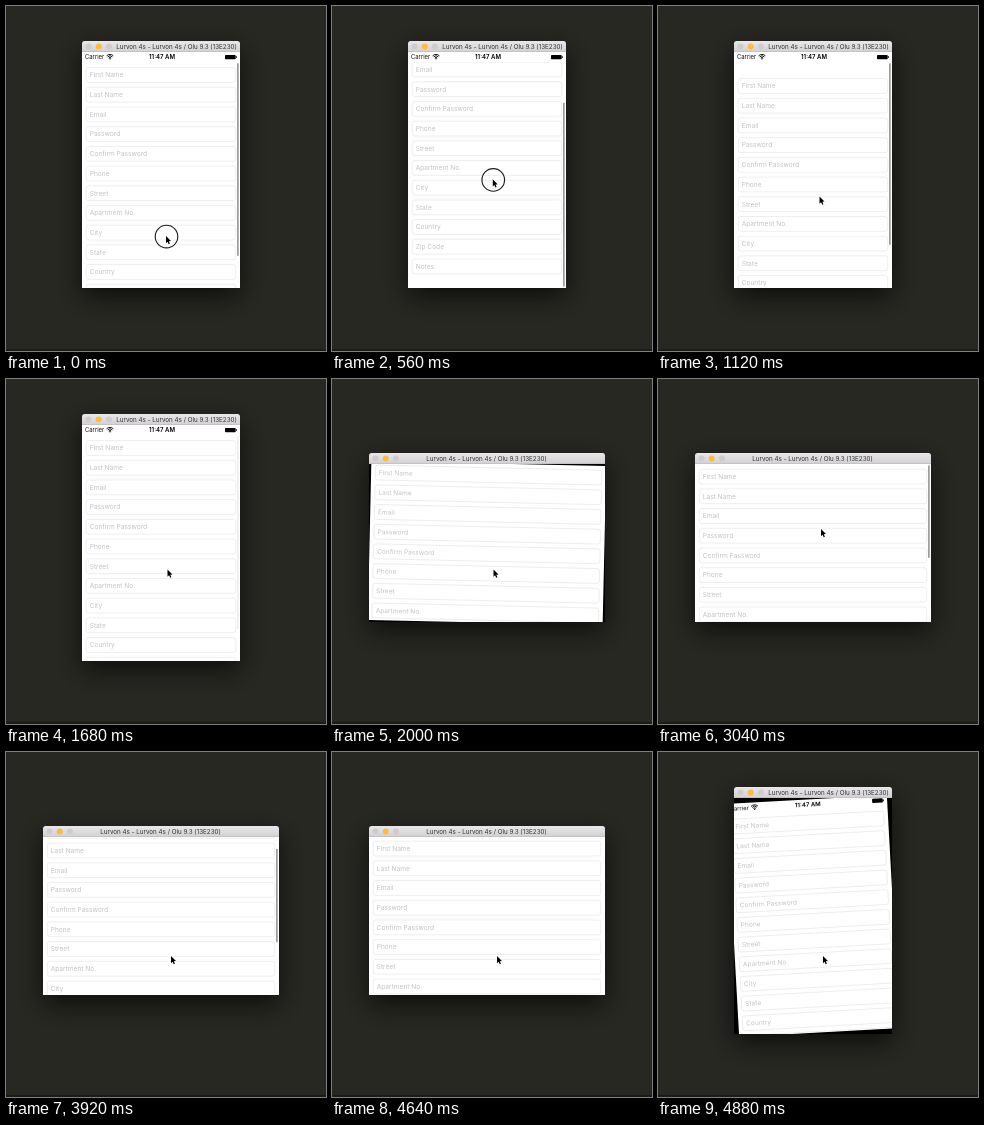
Write an HTML page with a canvas that moves like this. It is 320 by 345 pixels and loops after 4960 ms.

```html
<!DOCTYPE html>
<html lang="en">
<head>
<meta charset="utf-8">
<title>Rotating form</title>
<style>
html, body { margin: 0; width: 320px; height: 345px; overflow: hidden; background: #272822; }
canvas { display: block; width: 320px; height: 345px; }
</style>
</head>
<body>
<canvas id="stage"></canvas>
<script>
const W = 320, H = 345, LOOP = 4960, STEP = 80;
const FONT = 'Inter, Roboto, "Liberation Sans", sans-serif';
const TITLE = 'Lurvon 4s - Lurvon 4s / Olu 9.3 (13E230)';
const LABELS = ['First Name', 'Last Name', 'Email', 'Password', 'Confirm Password', 'Phone',
  'Street', 'Apartment No.', 'City', 'State', 'Country', 'Zip Code', 'Notes'];
const ROW = 19.7, FIELD = 14.8, CONTENT = 262, BAR = 11;
const CX = 155, CY = 164;
const TALL = { w: 158, h: 236, inset: 10, first: 23, title: 170.5 };
const WIDE = { w: 236, h: 158, inset: 0, first: 11.6, title: 154.5 };
const TURN = 240, TO_WIDE = 1777, TO_TALL = 4667;

const canvas = document.getElementById('stage');
const ctx = canvas.getContext('2d');
const dpr = window.devicePixelRatio || 1;
canvas.width = W * dpr;
canvas.height = H * dpr;

const smooth = p => p * p * (3 - 2 * p);
const easeOut = p => 1 - (1 - p) ** 3;
const linear = p => p;
const clamp = p => Math.max(0, Math.min(1, p));
const mix = (a, b, p) => a + (b - a) * p;

// Each key is [time, value, easing used to arrive there].
function track(keys, t) {
  if (t <= keys[0][0]) return keys[0][1];
  for (let i = 1; i < keys.length; i++) {
    const [t1, v1, ease = smooth] = keys[i];
    const [t0, v0] = keys[i - 1];
    if (t < t1) return mix(v0, v1, ease((t - t0) / (t1 - t0)));
  }
  return keys[keys.length - 1][1];
}

const SCROLL = [
  [160, 0], [600, -46], [960, -34], [1120, 11, linear], [1480, 0, easeOut],
  [2400, 0], [2720, -104], [2880, -88], [3040, 1, linear], [3120, 7, easeOut], [3360, 0],
  [3440, 0], [3680, -52], [3860, -24], [3920, -17.8, linear], [4240, 0, easeOut]
];
const POINTER_X = [[160, 160], [960, 161.5], [2160, 161.5], [2880, 163], [3280, 163], [3860, 165]];
const POINTER_Y = [
  [160, 230], [600, 172], [960, 190.5], [2160, 190.5], [2400, 240], [2720, 135],
  [2880, 150], [3280, 150], [3440, 230], [3680, 178], [3860, 204]
];
const PRESSES = [[0, 960], [2400, 2880], [3440, 3860]];
const INDICATOR = [
  [0, 1], [1480, 1], [1720, 0, linear], [2360, 0], [2400, 1, linear], [4360, 1], [4600, 0, linear]
];

function text(str, x, y, size, color, align = 'left', weight = 400) {
  ctx.font = `${weight} ${size}px ${FONT}`;
  ctx.fillStyle = color;
  ctx.textAlign = align;
  ctx.textBaseline = 'alphabetic';
  ctx.fillText(str, x, y + size * 0.36);
}

function box(x, y, w, h, r) {
  ctx.beginPath();
  ctx.roundRect(x, y, w, h, r);
}

function disc(x, y, r, color) {
  ctx.beginPath();
  ctx.arc(x, y, r, 0, Math.PI * 2);
  ctx.fillStyle = color;
  ctx.fill();
}

function drawWindow(mode) {
  const x = CX - mode.w / 2, y = CY - mode.h / 2 - BAR;
  ctx.save();
  ctx.shadowColor = 'rgba(0,0,0,0.68)';
  ctx.shadowBlur = 27 * dpr;
  ctx.shadowOffsetY = 9 * dpr;
  ctx.fillStyle = '#000';
  box(x, y, mode.w, mode.h + BAR, [2.5, 2.5, 0, 0]);
  ctx.fill();
  ctx.restore();

  const shade = ctx.createLinearGradient(0, y, 0, y + BAR);
  shade.addColorStop(0, '#e9e7e9');
  shade.addColorStop(1, '#d2d0d2');
  ctx.fillStyle = shade;
  box(x, y, mode.w, BAR, [2.5, 2.5, 0, 0]);
  ctx.fill();
  ctx.fillStyle = '#b5b3b5';
  ctx.fillRect(x, y + BAR - 0.5, mode.w, 0.5);
  ['#cfcccf', '#fdbc40', '#cfcccf'].forEach((c, i) => disc(x + 6.5 + i * 10.2, y + 5.6, 3, c));
  text(TITLE, mode.title, y + 5.6, 6.25, '#343434', 'center');
}

function drawStatus(w) {
  text('Carrier', 3, 5, 5.9, '#111');
  text('11:47 AM', w / 2 + 1, 5, 6, '#000', 'center', 600);
  ctx.strokeStyle = '#000';
  ctx.lineWidth = 0.9;
  for (const r of [1.7, 3.3, 4.8]) {
    ctx.beginPath();
    ctx.arc(28, 7.2, r, -Math.PI * 0.75, -Math.PI * 0.25);
    ctx.stroke();
  }
  disc(28, 6.8, 0.7, '#000');
  ctx.fillStyle = '#000';
  box(w - 15, 2.9, 10.7, 4.3, 0.8);
  ctx.fill();
  ctx.fillRect(w - 4, 4.2, 0.8, 1.7);
}

function drawRows(w, mode, offset) {
  ctx.strokeStyle = '#dcdcdc';
  ctx.lineWidth = 0.5;
  LABELS.forEach((label, i) => {
    const y = mode.first + i * ROW + offset;
    box(4.2, y - FIELD / 2, w - 8.4, FIELD, 2.5);
    ctx.stroke();
    text(label, 7.7, y, 6.6, '#c3c3c7');
  });
}

function drawIndicator(w, h, mode, offset, alpha) {
  if (alpha <= 0) return;
  const view = h - mode.inset, room = view - 2.5, limit = CONTENT - view;
  const over = Math.max(0, offset, -offset - limit);
  const full = room * view / CONTENT;
  const len = full - over;
  const y = mode.inset + 1.2 + clamp(-offset / limit) * (room - full) + (offset < -limit ? over : 0);
  ctx.globalAlpha = alpha;
  ctx.fillStyle = '#868686';
  box(w - 2.8, y, 1.4, len, 0.7);
  ctx.fill();
  ctx.globalAlpha = 1;
}

function drawScreen(mode, from, turn, angle, t) {
  const w = mix(from.w, mode.w, turn), h = mix(from.h, mode.h, turn);
  const offset = track(SCROLL, t);
  ctx.save();
  ctx.beginPath();
  ctx.rect(CX - mode.w / 2, CY - mode.h / 2, mode.w, mode.h);
  ctx.clip();
  ctx.translate(CX, CY);
  ctx.rotate(angle);
  ctx.translate(-w / 2, -h / 2);
  ctx.fillStyle = '#fff';
  ctx.fillRect(0, 0, w, h);
  if (mode === TALL) drawStatus(w);
  ctx.beginPath();
  ctx.rect(0, mode.inset, w, h - mode.inset);
  ctx.clip();
  drawRows(w, mode, offset);
  drawIndicator(w, h, mode, offset, track(INDICATOR, t));
  ctx.restore();
}

function drawPointer(t) {
  const x = track(POINTER_X, t), y = track(POINTER_Y, t);
  if (PRESSES.some(([a, b]) => t >= a && t < b)) {
    ctx.beginPath();
    ctx.arc(x + 0.5, y + 0.6, 11.3, 0, Math.PI * 2);
    ctx.strokeStyle = '#1c1c1c';
    ctx.lineWidth = 1.1;
    ctx.stroke();
  }
  ctx.beginPath();
  [[0, 0], [0, 7.2], [1.6, 5.7], [2.7, 8.2], [3.9, 7.7], [2.8, 5.2], [5, 5.1]]
    .forEach(([dx, dy]) => ctx.lineTo(x + dx, y + dy));
  ctx.closePath();
  ctx.lineJoin = 'round';
  ctx.strokeStyle = '#fff';
  ctx.lineWidth = 1.1;
  ctx.stroke();
  ctx.fillStyle = '#000';
  ctx.fill();
}

function draw(t) {
  ctx.setTransform(dpr, 0, 0, dpr, 0, 0);
  ctx.fillStyle = '#272822';
  ctx.fillRect(0, 0, W, H);
  ctx.fillStyle = '#1b1c18';
  ctx.fillRect(0, H - 2, W, 2);

  const wide = t >= TO_WIDE && t < TO_TALL;
  const mode = wide ? WIDE : TALL, from = wide ? TALL : WIDE;
  const start = wide ? TO_WIDE : TO_TALL;
  const turn = t < TO_WIDE ? 1 : smooth(clamp((t - start) / TURN));
  const angle = (wide ? 1 : -1) * (1 - turn) * Math.PI / 2;
  drawWindow(mode);
  drawScreen(mode, from, turn, angle, t);
  drawPointer(t);
}

const begin = performance.now();
function frame() {
  const t = (performance.now() - begin) % LOOP;
  draw(Math.floor(t / STEP) * STEP);
  requestAnimationFrame(frame);
}
frame();
</script>
</body>
</html>
```
